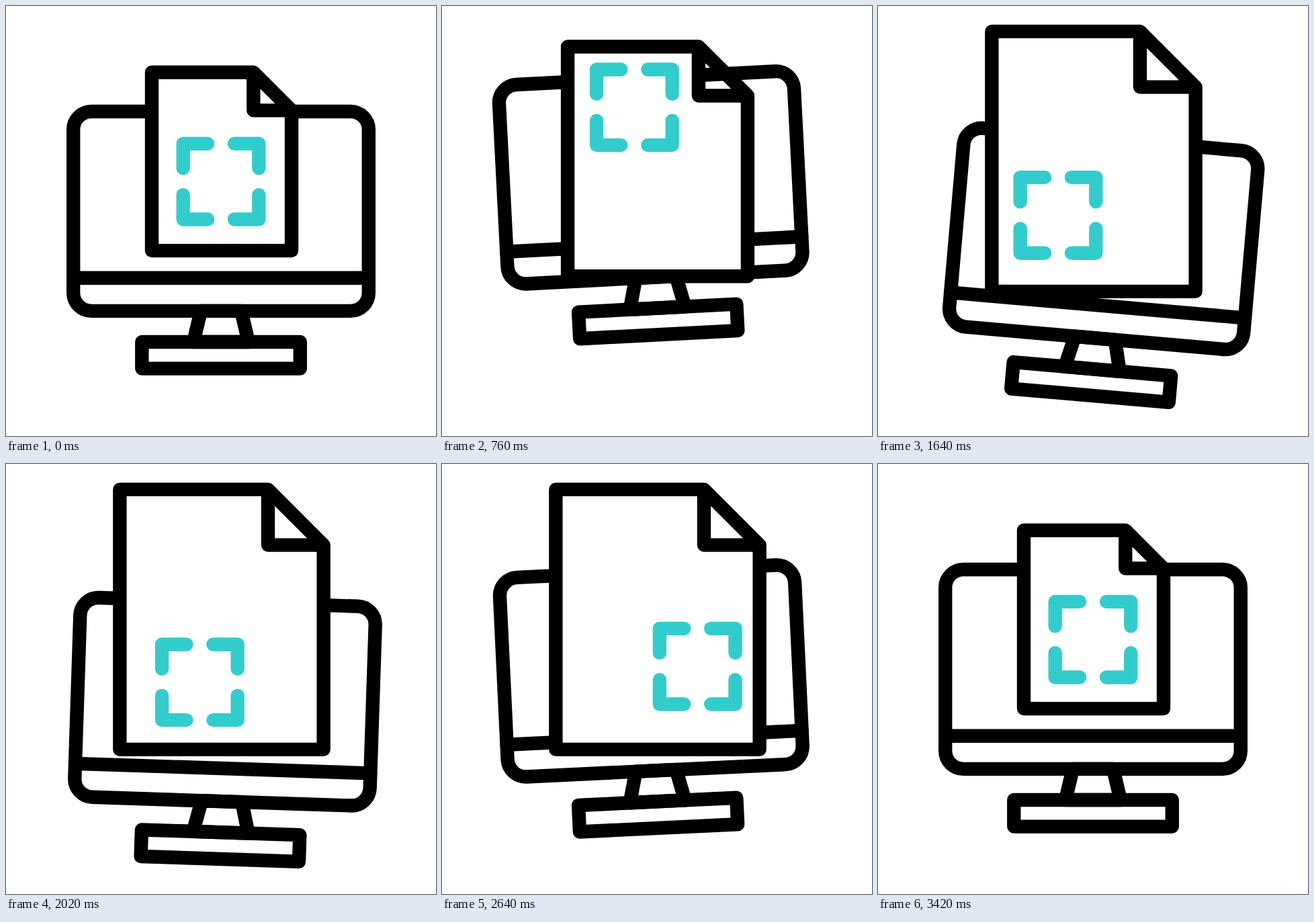
These frames come from a looping animation (640 by 640 pixels, 3.6 s). An HTML page:

```html
<!DOCTYPE html>
<html lang="en">
<head>
<meta charset="utf-8">
<title>Screen capture icon</title>
<style>
  html, body { margin: 0; width: 100%; height: 100%; overflow: hidden; background: #fff; }
  svg { display: block; width: 100%; height: 100%; }
  path, rect { stroke-width: 20.4; stroke-linecap: round; stroke-linejoin: round; }
</style>
</head>
<body>
<svg viewBox="0 0 640 640" fill="none" stroke="#000">
  <g id="monitor">
    <rect x="100.2" y="157" width="439.6" height="296.9" rx="27"/>
    <path d="M100.2 404.8H539.8M290 453.9H350L361 500H279Z"/>
    <rect x="202.3" y="500" width="235.5" height="39.6"/>
  </g>
  <path id="page" fill="#fff"/>
  <g id="marks" stroke="#3cc">
    <path id="corner" d="M-20-56.3H-56.3V-20"/>
    <use href="#corner" transform="rotate(90)"/>
    <use href="#corner" transform="rotate(180)"/>
    <use href="#corner" transform="rotate(270)"/>
  </g>
</svg>
<script>
const STEP = 20, LOOP = 3600;
const [monitor, page, marks] = ['monitor', 'page', 'marks'].map(id => document.getElementById(id));

// The page grows about its centre while its line weight stays the same.
function pagePath(scale) {
  const w = 104 * scale, h = 132.7 * scale, fold = 56.7 * scale;
  return `M${-w} ${-h}H${w - fold}l${fold} ${fold}V${h}H${-w}Z` +
    `M${w - fold} ${-h}v${fold}h${fold}`;
}

function draw(now) {
  const n = Math.floor(now % LOOP / STEP);
  // Sine ease from 0 to 1 between steps a and b.
  const ease = (a, b) => (1 - Math.cos(Math.PI * Math.min(1, Math.max(0, (n - a) / (b - a))))) / 2;

  const lift = 51 * (2 * ease(35, 94.5) - ease(10, 35) - ease(94.5, 138));
  const tilt = 10 * ease(54, 83) - 5 * ease(18, 54) - 8 * ease(83, 125) + 3 * ease(125, 161);
  monitor.setAttribute('transform', `translate(0 ${lift}) rotate(${tilt} 320 487)`);

  const scale = 1 - 0.07 * ease(8, 22) + 0.528 * ease(22, 48) - 0.458 * ease(145, 171);
  page.setAttribute('d', pagePath(scale));
  page.setAttribute('transform', 'translate(321 231.4)');

  // The marks visit three corners of the page and come back.
  const up = ease(21, 44), down = ease(44, 91.2), right = ease(91.2, 126), back = ease(126, 162);
  const x = 320 - 40 * up - 13.2 * down + 117.7 * right - 64.5 * back;
  const y = 261.2 - 131.2 * up + 199.5 * down - 25.5 * right - 42.8 * back;
  marks.setAttribute('transform', `translate(${x} ${y})`);
}

let start;
function tick(now) {
  start ??= now;
  draw(now - start);
  requestAnimationFrame(tick);
}
draw(0);
requestAnimationFrame(tick);
</script>
</body>
</html>
```
